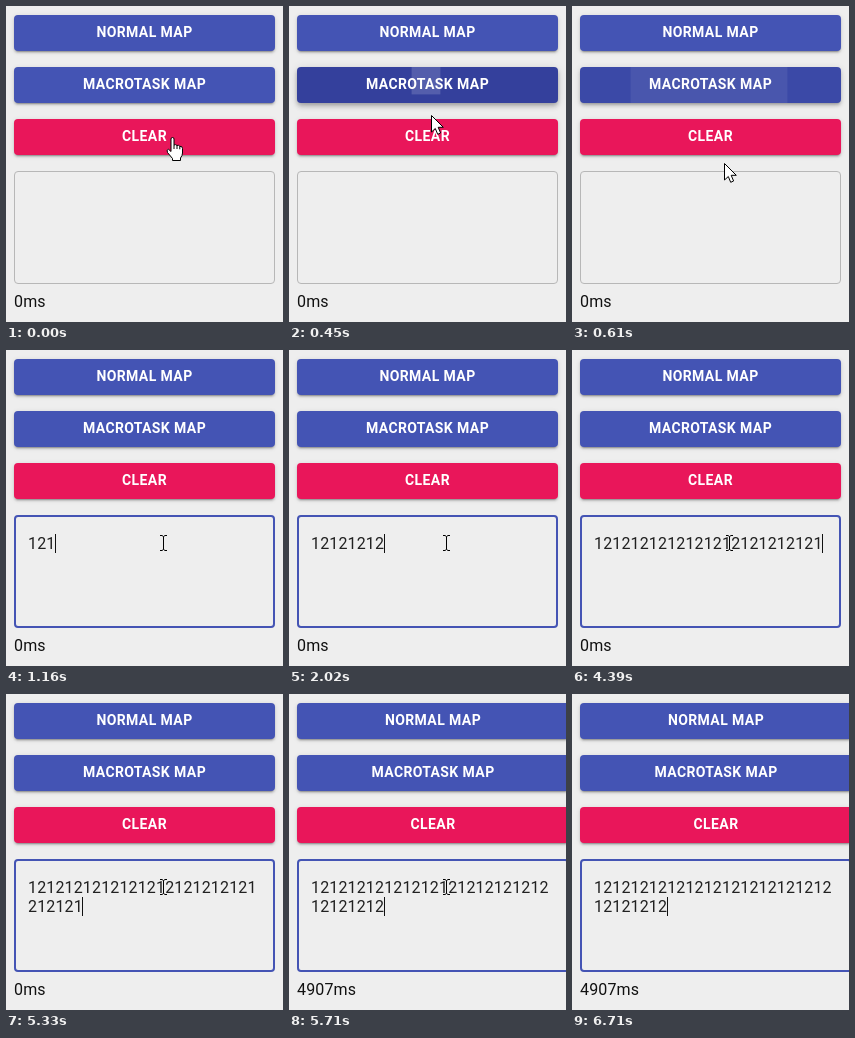
Recreate the animation shown at these times as an HTML page. Size 277 px wide and 316 px high, loop 6.88 s.

```html
<!DOCTYPE html>
<html lang="en">
<head>
<meta charset="utf-8">
<title>Task map demo</title>
<style>
html, body { margin: 0; width: 100%; height: 100%; overflow: hidden; background: #eee; }
#stage { position: relative; width: 277px; height: 316px; overflow: hidden;
  font: 16px/19px Roboto, Arial, sans-serif; letter-spacing: .00938em; color: #212121; }
#stage > * { position: absolute; box-sizing: border-box; }
.btn, #area { left: 8px; width: 261px; border-radius: 4px; }
.wide .btn, .wide #area { width: 272px; }
.btn { height: 36px; overflow: hidden; background: #4454b4; color: #fff; text-align: center;
  font-size: 14px; font-weight: 600; line-height: 35px; letter-spacing: .02857em;
  box-shadow: 0 3px 1px -2px #0003, 0 2px 2px #00000024, 0 1px 5px #0000001f; }
#clear { background: #e9165a; }
#ripple { position: absolute; left: 129px; top: 13px; width: 0; height: 0; border-radius: 50%; background: #fff; }
#area { top: 165px; height: 113px; border: 1px solid #b7b7b7; }
#area.focus { border: 2px solid #4454b4; }
#text { left: 22px; top: 184px; margin: 0; font: inherit; }
#caret { width: 1px; height: 19px; background: #111; }
#time { left: 8px; top: 286px; color: #111; }
#pointer { left: 0; top: 0; width: 277px; height: 316px; }
#pointer path { stroke: #000; stroke-linejoin: round; }
</style>
</head>
<body>
<div id="stage">
  <div class="btn" style="top:9px">NORMAL MAP</div>
  <div class="btn" id="macro" style="top:61px"><i id="ripple"></i>MACROTASK MAP</div>
  <div class="btn" id="clear" style="top:113px">CLEAR</div>
  <div id="area"></div>
  <pre id="text"></pre>
  <div id="caret"></div>
  <div id="time"></div>
  <svg id="pointer">
    <g id="hand">
      <path fill="#fff" d="M-2 14.500V2Q-2 .5-.5.5T1 2V8Q2.500 7 4 8.500Q5.500 7.700 6.800 9.300Q9.500 9 9.500 11.500V16Q9.500 18.500 7.500 21V23.500H-.5V21.500L-5.500 15.500Q-6.800 12.500-4.500 12.300Z"/>
      <path fill="none" d="M1 8v4M4 8.500V12M6.800 9.300v3"/>
    </g>
    <g id="arrow"><path fill="#fff" d="M.5.5V17L4.300 13.500L6.700 19.300L9.600 18L7.200 12.300H12.300Z"/></g>
    <g id="beam"><path fill="none" d="M-3 -7.500H-1L.5 -6.500L2 -7.500H4M.5 -6.500V6.500M-3 7.500H-1L.5 6.500L2 7.500H4"/></g>
  </svg>
</div>
<script>
const LOOP = 6880, ADVANCE = 9.13;
const $ = id => document.getElementById(id);
const clamp = x => Math.max(0, Math.min(1, x));
const ramp = (t, a, b) => clamp((t - a) / (b - a));

// Typing bursts: first key, last key, number of keys
const bursts = [[830, 990, 2], [1160, 2190, 8], [2340, 3280, 7],
  [3450, 4390, 8], [4540, 5330, 6], [5410, 5710, 3]];

// Pointer: start time, shape, x, y
const moves = [[0, "hand", 167, 131], [70, "hand", 162, 116], [150, "arrow", 151, 100],
  [220, "hand", 141, 83], [300, "hand", 137, 74], [450, "arrow", 142, 109],
  [530, "hand", 147, 132], [600, "arrow", 152, 157], [680, "beam", 157, 193],
  [5860, "beam", 166, 196], [6030, "", 0, 0]];

const typed = t => bursts.reduce((sum, [a, b, n]) =>
  sum + (t < a ? 0 : Math.min(n, 1 + Math.floor((t - a + 6) * (n - 1) / (b - a)))), 0);

function drawText(t, wide) {
  const count = typed(t), perLine = wide ? 26 : 25;
  const digits = "12".repeat(17).slice(0, count);
  const first = digits.slice(0, perLine), second = digits.slice(perLine);
  $("text").textContent = first + "\n" + second;
  $("caret").style.left = Math.floor(22 + (second || first).length * ADVANCE) + "px";
  $("caret").style.top = (second ? 203 : 184) + "px";
  $("caret").hidden = t < 750 || (t >= 6250 && t < 6710);
}

function drawButton(t) {
  const dark = ramp(t, 190, 350) * (1 - ramp(t, 500, 750));
  const mix = (a, b) => a + (b - a) * dark;
  const style = $("macro").style;
  style.backgroundColor = `rgb(${mix(68, 52)},${mix(84, 64)},${mix(180, 156)})`;
  style.boxShadow = `0 ${mix(3, 2)}px ${mix(1, 4)}px ${mix(-2, -1)}px #0003,
    0 ${mix(2, 4)}px ${mix(2, 5)}px #00000024, 0 1px ${mix(5, 10)}px #0000001f`;
  const radius = t < 370 ? 0 : 14 + 120 * ramp(t, 450, 750);
  $("ripple").style.boxShadow = `0 0 0 ${radius}px #fff`;
  $("ripple").style.opacity = .16 * (1 - ramp(t, 450, 750));
}

function drawPointer(t) {
  const [, shape, x, y] = moves.findLast(m => t >= m[0]);
  for (const id of ["hand", "arrow", "beam"]) {
    $(id).style.display = id === shape ? "" : "none";
    $(id).setAttribute("transform", `translate(${x} ${y})`);
  }
}

const start = performance.now();
function frame() {
  const t = (performance.now() - start) % LOOP, done = t >= 5410;
  $("stage").className = done ? "wide" : "";
  $("area").className = t >= 750 ? "focus" : "";
  $("time").textContent = done ? "4907ms" : "0ms";
  drawText(t, done);
  drawButton(t);
  drawPointer(t);
  requestAnimationFrame(frame);
}
frame();
</script>
</body>
</html>
```
